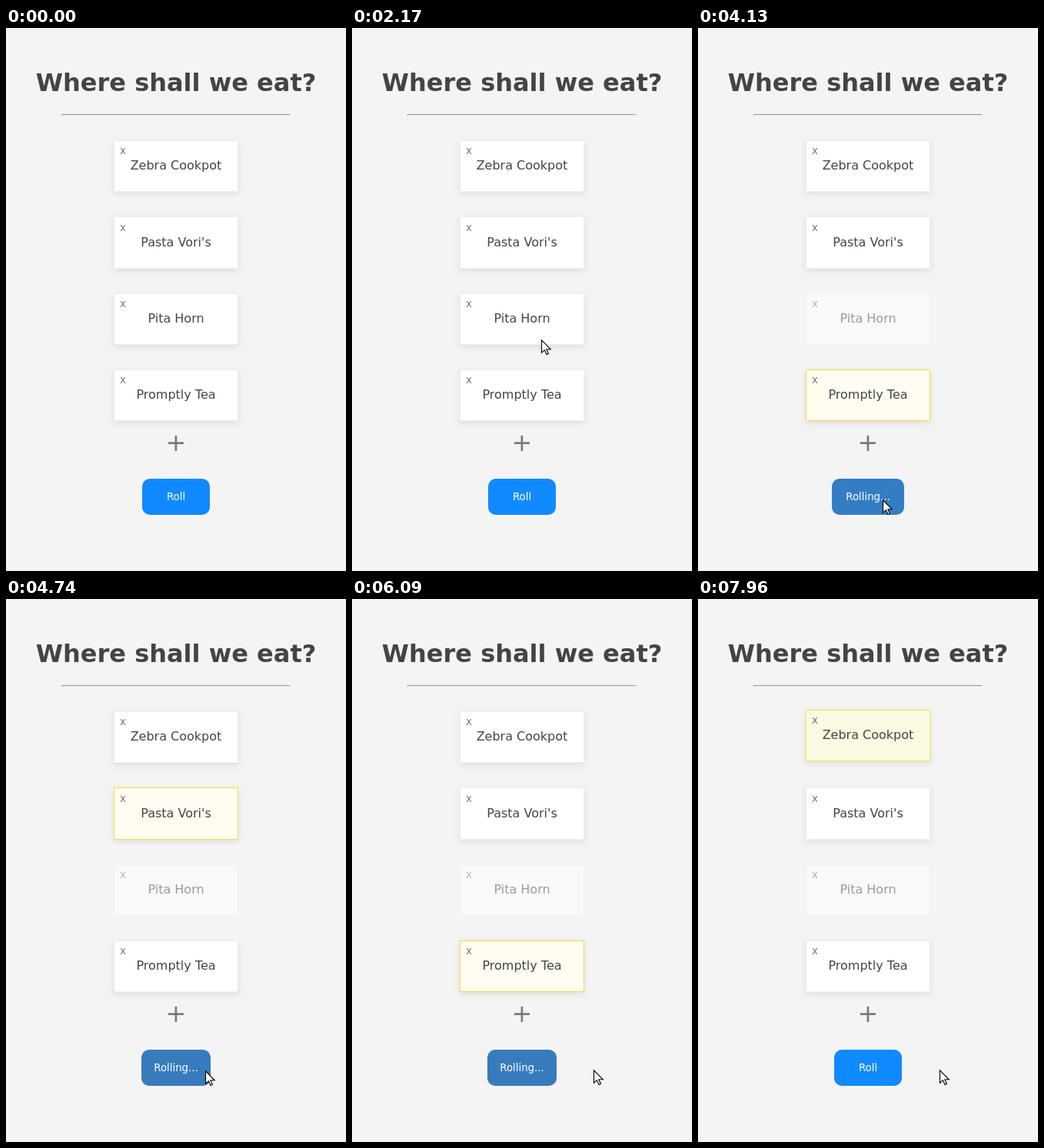
Recreate the animation shown at these times as an HTML page. Size 442 by 706 pixels, loop 8000 ms.

```html
<!DOCTYPE html>
<html lang="en">
<head>
<meta charset="utf-8">
<title>Where shall we eat?</title>
<style>
  html, body { margin: 0; width: 100%; height: 100%; overflow: hidden; background: #f4f4f4; }
  svg { display: block; width: 100%; height: 100%; }
  text { font-family: "DejaVu Sans", sans-serif; font-size: 16px; fill: #444; text-anchor: middle; }
  .title { font-size: 32px; font-weight: bold; }
  .small { font-size: 13.333px; }
  .close { text-anchor: start; fill: #777; }
  .plus { font-size: 32px; fill: #777; }
  .card rect { filter: drop-shadow(0 3px 4px rgba(0, 0, 0, .09)); }
  .card.off { opacity: .5; }
  .card.off rect { filter: none; }
</style>
</head>
<body>
<svg viewBox="0 0 442 706">
  <rect width="442" height="706" fill="#f4f4f4"/>
  <text class="title" x="221" y="82">Where shall we eat?</text>
  <rect x="72" y="112" width="298" height="2" fill="#eee"/>
  <path d="M72 112H369V113H73V114H72Z" fill="#999"/>
  <g id="cards"></g>
  <text class="plus" x="221" y="550">+</text>
  <rect id="button" y="586" height="47" rx="10"/>
  <text id="label" class="small" x="221" y="614" style="fill:#fff"></text>
  <path id="cursor" d="M.5 .9V17.2L4.4 13.6L7 19.5L9.4 18.5L6.9 12.8H12.3Z"
        fill="#fff" stroke="#000" stroke-width="1.1"/>
</svg>
<script>
const LOOP = 8000, ENTER = 610, DISABLE = 2700, ROLL = 3900, WIN = 7780;
const MID = 221, PITCH = 99.4;
const byId = id => document.getElementById(id);

const names = ["Zebra Cookpot", "Pasta Vori's", "Pita Horn", "Promptly Tea"];
const cards = names.map((name, i) => {
  const top = Math.round(146 + PITCH * i);
  const bottom = Math.round(213.2 + PITCH * i);
  const g = document.createElementNS("http://www.w3.org/2000/svg", "g");
  g.innerHTML =
    `<rect x="140.5" y="${top + .5}" width="161" height="${bottom - top - 1}"/>` +
    `<text class="small close" x="148" y="${bottom - 49}">x</text>` +
    `<text x="${MID}" y="${bottom - 29}">${name}</text>`;
  byId("cards").append(g);
  return { g, box: g.firstChild };
});

// Each move eases to a point, bowing to the right on the way
const moves = [
  { start: ENTER, end: 780, x: 378, y: 473, bow: 0 },
  { start: 1240, end: 1620, x: 258, y: 594, bow: 0 },
  { start: 1740, end: 2390, x: 241, y: 397, bow: 27 },
  { start: 2910, end: 3650, x: 240, y: 613, bow: 54 },
  { start: 4680, end: 5330, x: 314, y: 612, bow: 0 }
];

const lerp = (a, b, p) => a + (b - a) * p;
const easeOut = (p, power) => 1 - (1 - Math.max(0, Math.min(1, p))) ** power;
const mix = (a, b, p) => `rgb(${a.map((v, i) => Math.round(lerp(v, b[i], p)))})`;

// Hop n happens at first * n + growth * n * n after the roll starts
function activeCard(t) {
  if (t < ROLL) return -1;
  const enabled = [0, 1, 3], first = 95, growth = 3.55, last = 21;
  const hop = (Math.sqrt(first ** 2 + 4 * growth * (t - ROLL)) - first) / (2 * growth);
  return enabled[Math.min(last, Math.floor(hop)) % enabled.length];
}

function drawCards(t) {
  const active = activeCard(t);
  const win = easeOut((t - WIN) / 170, 2);
  cards.forEach(({ g, box }, i) => {
    const on = i === active;
    g.setAttribute("class", i === 2 && t >= DISABLE ? "card off" : "card");
    box.setAttribute("fill", on ? mix([255, 253, 242], [251, 250, 226], win) : "#fff");
    box.setAttribute("stroke", on ? mix([255, 217, 59], [243, 232, 79], win) : "#eee");
    g.setAttribute("transform", `translate(0 ${on ? -Math.round(2 * win) : 0})`);
  });
}

function drawButton(t) {
  const rolling = t >= ROLL && t < WIN;
  const busy = t < WIN ? easeOut((t - ROLL) / 350, 2) : 1 - easeOut((t - WIN) / 170, 2);
  const width = (rolling ? 58.2 : 24.8) + 2 * lerp(32, 16, busy);
  const left = Math.round(MID - width / 2);
  const button = byId("button");
  button.setAttribute("x", left);
  button.setAttribute("width", 2 * (MID - left));
  button.setAttribute("fill", mix([16, 138, 255], [56, 123, 188], busy));
  byId("label").textContent = rolling ? "Rolling..." : "Roll";
}

function drawCursor(t) {
  let x = 421, y = 429;
  for (const m of moves) {
    const p = easeOut((t - m.start) / (m.end - m.start), 3);
    x = lerp(x, m.x, p) + m.bow * 4 * p * (1 - p);
    y = lerp(y, m.y, p);
  }
  const cursor = byId("cursor");
  cursor.style.display = t < ENTER ? "none" : "";
  cursor.setAttribute("transform", `translate(${Math.round(x)} ${Math.round(y)})`);
}

function draw(t) {
  drawCards(t);
  drawButton(t);
  drawCursor(t);
}

const start = performance.now();
function tick() {
  draw((performance.now() - start) % LOOP);
  requestAnimationFrame(tick);
}
tick();
</script>
</body>
</html>
```
